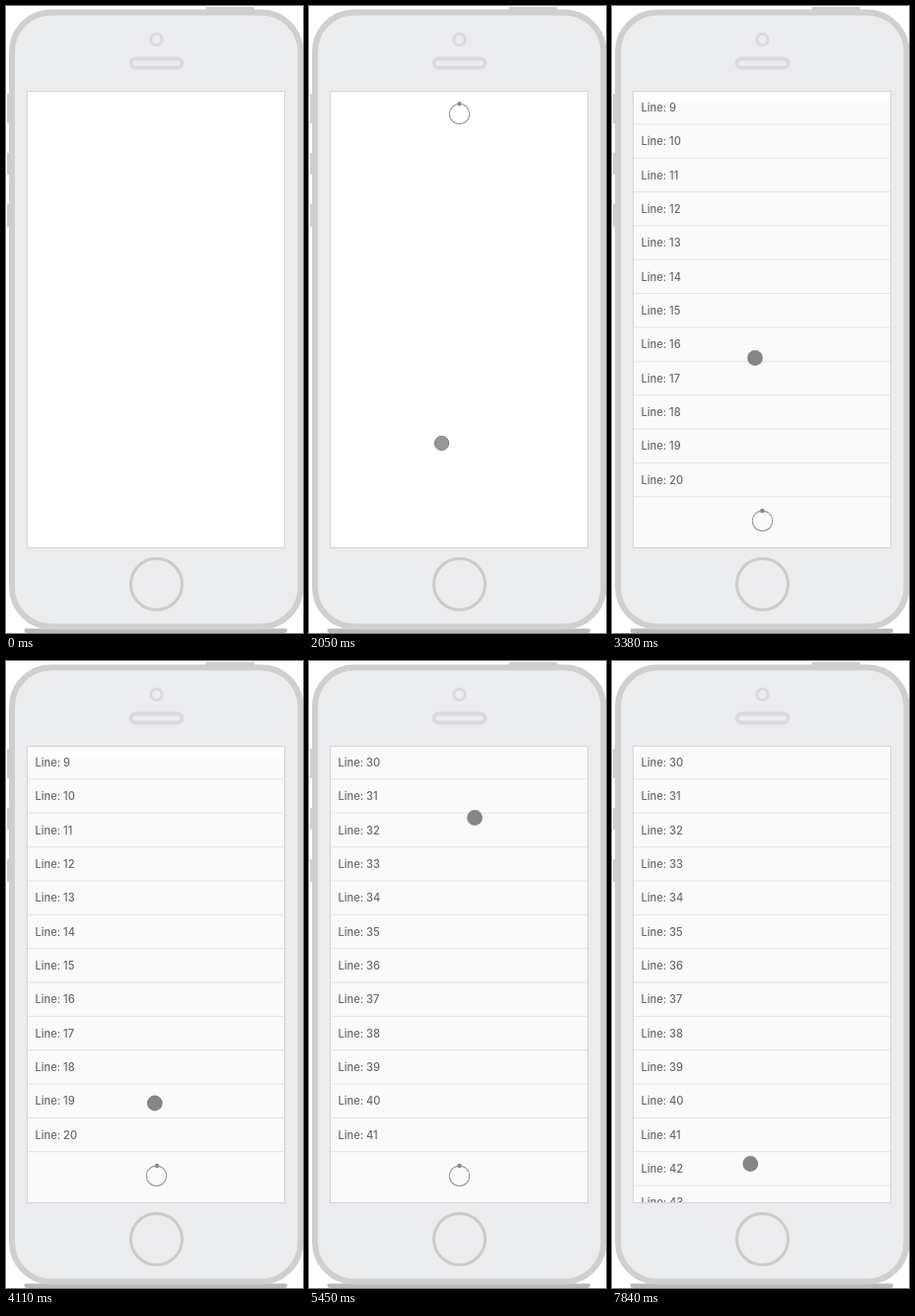
These frames come from a looping animation (301 px wide and 636 px high, 7.99 s). An HTML page with a canvas:

```html
<!DOCTYPE html>
<html lang="en">
<head>
<meta charset="utf-8">
<title>Infinite list</title>
<style>
  html, body { margin: 0; width: 100%; height: 100%; overflow: hidden; background: #fff; }
  canvas { display: block; width: 301px; height: 636px; }
</style>
</head>
<body>
<canvas id="stage" width="301" height="636"></canvas>
<script>
const ctx = document.getElementById('stage').getContext('2d');
const LOOP = 7990;
const STEP = LOOP / 54;
const ROW = 34.35;
const SPIN = 680;

// Pointer stops: time, x, y
const pointerPath = [
  [870, 57, 317], [1035, 92, 332], [1184, 107, 350], [1331, 114, 390.5],
  [1800, 134.5, 443.5], [2665, 134.5, 443.5], [3100, 145, 357], [3680, 145, 357],
  [4143, 150.8, 448.5], [4850, 152, 456], [5350, 168, 159], [5800, 168, 159],
  [6700, 153.3, 456.5], [6900, 153.3, 456.5], [7550, 140.3, 510]
];

// What the screen shows from each time on; every load takes two seconds
const scenes = [
  { at: 0 },
  { at: 150, spinnerY: 109.5 },
  { at: 2150, first: 0, count: 14, line: 119.3, top: 97 },
  { at: 2960, first: 9, count: 12, line: 119.9, top: 97, spinnerY: 522.3 },
  { at: 4960, first: 9, count: 14, line: 119.9, top: 97 },
  { at: 5330, first: 30, count: 12, line: 119.9, top: 92, spinnerY: 522.3 },
  { at: 7330, first: 30, count: 14, line: 119.9, top: 92 }
];

const ease = u => u * u * (3 - 2 * u);

function roundRect(x, y, w, h, r, fill, stroke, lineWidth) {
  ctx.beginPath();
  ctx.roundRect(x, y, w, h, r);
  paint(fill, stroke, lineWidth);
}

function circle(x, y, r, fill, stroke, lineWidth) {
  ctx.beginPath();
  ctx.arc(x, y, r, 0, 2 * Math.PI);
  paint(fill, stroke, lineWidth);
}

function paint(fill, stroke, lineWidth) {
  if (fill) {
    ctx.fillStyle = fill;
    ctx.fill();
  }
  if (stroke) {
    ctx.strokeStyle = stroke;
    ctx.lineWidth = lineWidth;
    ctx.stroke();
  }
}

function drawPhone() {
  const frame = '#cfcfcf';
  ctx.fillStyle = '#fff';
  ctx.fillRect(0, 0, 301, 636);
  roundRect(18.5, 631.5, 266.5, 4.5, [2, 2, 4, 4], '#b9b9b9');
  roundRect(202.5, 1, 49, 5, 1, frame);
  for (const [y, h] of [[89, 30], [149, 22], [201, 23]]) roundRect(1, y, 5, h, 1, frame);
  roundRect(6, 6.5, 292.5, 623, 40, '#ebecee', frame, 6);
  circle(152.5, 34, 5.7, null, '#d9dadc', 3);
  roundRect(126.5, 53.5, 52, 9, 4.5, null, '#d9dadc', 4);
  circle(152.5, 586.5, 26, null, '#cbcbcb', 3);
  ctx.fillStyle = '#fff';
  ctx.fillRect(22, 87, 260, 462);
}

function drawList({ first, count, line, top }) {
  ctx.fillStyle = '#fafafa';
  ctx.fillRect(22, top, 260, 549 - top);
  ctx.font = '500 11.1px Inter, sans-serif';
  for (let i = 0; i < count; i++) {
    const y = line + i * ROW;
    ctx.fillStyle = '#e4e4e4';
    ctx.fillRect(22, y - 0.5, 260, 1);
    ctx.fillStyle = '#6a6a6a';
    ctx.fillText('Line: ' + (first + i), 29.5, y - 13);
  }
}

function drawSpinner(y, t) {
  const angle = 2 * Math.PI * ease((t / SPIN + 0.96) % 1);
  circle(152.5, y, 10.2, null, '#a0a0a0', 1.1);
  circle(152.5 + 10.2 * Math.sin(angle), y - 10.2 * Math.cos(angle), 2.3, '#8c8c8c');
}

function drawPointer(t, overList) {
  if (t < pointerPath[0][0]) return;
  const next = pointerPath.findIndex(p => p[0] > t);
  const b = pointerPath[next < 0 ? pointerPath.length - 1 : next];
  const a = next < 0 ? b : pointerPath[next - 1];
  const u = a === b ? 0 : ease((t - a[0]) / (b[0] - a[0]));
  const x = a[1] + (b[1] - a[1]) * u;
  const y = a[2] + (b[2] - a[2]) * u;
  if (overList) circle(x, y, 7.9, '#868686');
  else circle(x, y, 7.2, '#969696', '#868686', 1);
}

function draw(now) {
  const time = now % LOOP;
  const t = Math.floor((time + 40) / STEP) * STEP;
  const scene = scenes.findLast(s => time >= s.at);
  drawPhone();
  ctx.save();
  ctx.beginPath();
  ctx.rect(22, 87, 260, 462);
  ctx.clip();
  if (scene.count) drawList(scene);
  if (scene.spinnerY) drawSpinner(scene.spinnerY, t);
  drawPointer(t, Boolean(scene.count));
  ctx.restore();
  ctx.strokeStyle = '#d2d5d8';
  ctx.lineWidth = 1;
  ctx.strokeRect(21.5, 86.5, 261, 463);
}

const start = performance.now();
function tick() {
  draw(performance.now() - start);
  requestAnimationFrame(tick);
}
tick();
</script>
</body>
</html>
```
